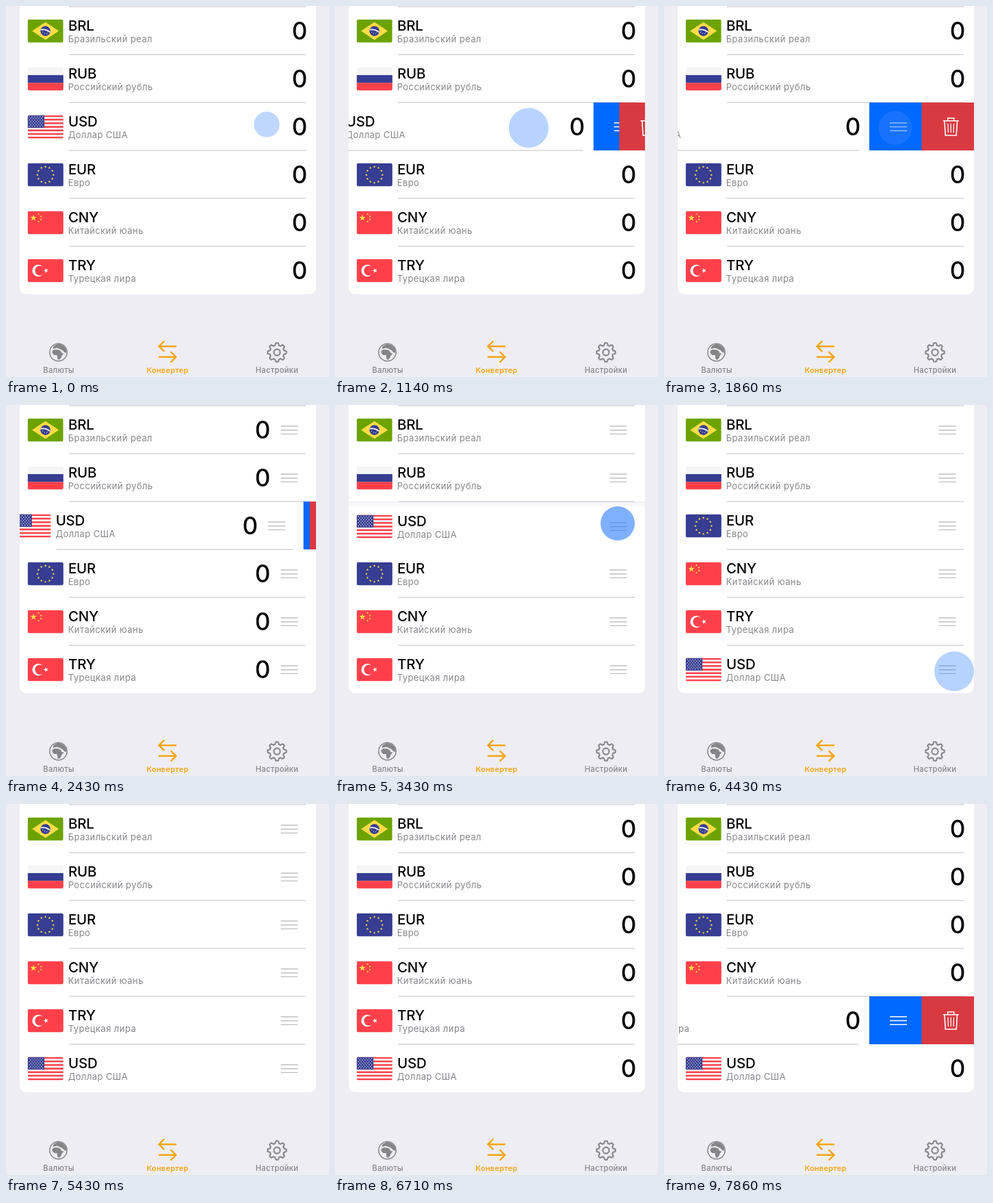
Write an HTML page with a canvas that moves like this. It is 472 px wide and 542 px high and loops after 8 s.

```html
<!DOCTYPE html>
<html lang="ru">
<head>
<meta charset="utf-8">
<title>Конвертер валют</title>
<style>
html, body { margin: 0; width: 100%; height: 100%; overflow: hidden; background: #eeedf4; }
canvas { display: block; width: 472px; height: 542px; }
</style>
</head>
<body>
<canvas id="stage"></canvas>
<script>
const W = 472, H = 542, LOOP = 8000, FPS = 7;
const LEFT = 20, RIGHT = 453, BOTTOM = 421, ROW = 70, OPEN = 153;
const PAGE = '#eeedf4', LINE = '#d2d2d5', GREY = '#85858a', ORANGE = '#f5a514';
const RED = '#ff404a', NAVY = '#363d92', YELLOW = '#ffdc45', WHITE = '#f5f5f5';
const FONT = 'Inter, Roboto, sans-serif';

const canvas = document.getElementById('stage');
const c = canvas.getContext('2d');
const dpr = window.devicePixelRatio || 1;
canvas.width = W * dpr;
canvas.height = H * dpr;

const clamp = x => Math.max(0, Math.min(1, x));
const span = (t, a, b) => clamp((t - a) / (b - a));
const smooth = x => x * x * (3 - 2 * x);
const ease = (t, a, b) => smooth(span(t, a, b));
const easeOut = (t, a, b) => 1 - (1 - span(t, a, b)) ** 3;
const mix = (a, b, p) => a + (b - a) * p;

// ---------- drawing helpers ----------
function rect(x, y, w, h, fill) {
  c.fillStyle = fill;
  c.fillRect(x, y, w, h);
}

function disc(x, y, r, fill) {
  c.beginPath();
  c.arc(x, y, r, 0, 2 * Math.PI);
  c.fillStyle = fill;
  c.fill();
}

function poly(points, fill) {
  c.beginPath();
  points.forEach(([x, y]) => c.lineTo(x, y));
  c.closePath();
  c.fillStyle = fill;
  c.fill();
}

function line(points, color, width) {
  c.beginPath();
  points.forEach(([x, y], i) => i ? c.lineTo(x, y) : c.moveTo(x, y));
  c.strokeStyle = color;
  c.lineWidth = width;
  c.stroke();
}

function star(x, y, r, fill, turn = 0) {
  const points = [];
  for (let i = 0; i < 10; i++) {
    const a = turn - Math.PI / 2 + i * Math.PI / 5, d = i % 2 ? r * 0.42 : r;
    points.push([x + d * Math.cos(a), y + d * Math.sin(a)]);
  }
  poly(points, fill);
}

function text(s, x, y, size, weight, color, align = 'left', spacing = 0) {
  c.font = `${weight} ${size}px ${FONT}`;
  c.letterSpacing = spacing + 'px';
  c.textAlign = align;
  c.fillStyle = color;
  c.fillText(s, x, y);
}

function bars(x, y, color, width) {
  for (let i = -1; i <= 1; i++) line([[x - 12.5, y + i * 5.7], [x + 12.5, y + i * 5.7]], color, width);
}

// ---------- flags, 52 x 34 ----------
const flags = {
  BRL() {
    rect(0, 0, 52, 34, '#6ca300');
    poly([[6.5, 17], [26, 4], [45.5, 17], [26, 30]], YELLOW);
    disc(26, 17, 7.3, NAVY);
    c.save();
    c.beginPath();
    c.arc(26, 17, 7.3, 0, 7);
    c.clip();
    c.beginPath();
    c.arc(22, 32, 17.3, 0, 7);
    c.strokeStyle = WHITE;
    c.lineWidth = 1.8;
    c.stroke();
    c.restore();
    [[22, 18.5], [25, 20.5], [28, 21], [29.5, 18.5]].forEach(([x, y]) => disc(x, y, 0.6, WHITE));
  },
  RUB() {
    [WHITE, NAVY, RED].forEach((color, i) => rect(0, i * 34 / 3, 52.3, 11.4, color));
  },
  USD() {
    for (let i = 0; i < 13; i++) rect(0, i * 34 / 13, 52.3, 2.7, i % 2 ? WHITE : RED);
    rect(0, 0, 24.5, 18.3, NAVY);
    for (let j = 0; j < 7; j++)
      for (let i = 0; i < 6 - j % 2; i++) star(2.6 + i * 3.9 + j % 2 * 1.95, 2.3 + j * 2.3, 1.1, WHITE);
  },
  EUR() {
    rect(0, 0, 52.3, 34, NAVY);
    for (let i = 0; i < 12; i++) {
      const a = i * Math.PI / 6;
      star(26 + 11.7 * Math.cos(a), 17 + 11.7 * Math.sin(a), 1.9, YELLOW);
    }
  },
  CNY() {
    rect(0, 0, 52.3, 34, RED);
    star(8.5, 10, 4.9, YELLOW);
    [[16, 4.5], [19.5, 8], [19.5, 12.3], [16, 15.5]].forEach(([x, y], i) => star(x, y, 1.8, YELLOW, i * 0.4));
  },
  TRY() {
    rect(0, 0, 52.3, 34, RED);
    disc(15.5, 17, 8.8, WHITE);
    disc(18, 17, 7.2, RED);
    star(26.8, 17, 3.8, WHITE, -Math.PI / 10);
  }
};

function flag(code, x, y) {
  c.save();
  c.translate(x, y);
  c.beginPath();
  c.roundRect(0, 0, 52.3, 34, 3);
  c.clip();
  flags[code]();
  c.restore();
}

// ---------- rows ----------
const rows = [
  { code: 'BRL', name: 'Бразильский реал' },
  { code: 'RUB', name: 'Российский рубль' },
  { code: 'USD', name: 'Доллар США' },
  { code: 'EUR', name: 'Евро', moves: 3575 },
  { code: 'CNY', name: 'Китайский юань', moves: 3747 },
  { code: 'TRY', name: 'Турецкая лира', moves: 3913 }
];

const dragged = t => ease(t, 3400, 4125);
const swipe = (t, start) => 56 * ease(t, start, start + 570) + (OPEN - 56) * ease(t, start + 570, start + 1070);

function rowTop(row, i, t) {
  if (row.code === 'USD') return mix(141, 359, dragged(t)) - 8 * ease(t, 4280, 4420);
  return 1 + i * ROW - (row.moves ? ROW * ease(t, row.moves, row.moves + 220) : 0);
}

function rowShift(row, t) {
  if (row.code === 'USD') return swipe(t, 430) - OPEN * easeOut(t, 2140, 2709);
  return row.code === 'TRY' ? swipe(t, 6780) : 0;
}

function trash(x, y) {
  const white = '#fff';
  line([[x - 11.5, y - 8.5], [x + 11.5, y - 8.5]], white, 1.6);
  line([[x - 4.5, y - 8.5], [x - 4.5, y - 12.5], [x + 4.5, y - 12.5], [x + 4.5, y - 8.5]], white, 1.5);
  line([[x - 9.3, y - 8.5], [x - 8, y + 12.8], [x + 8, y + 12.8], [x + 9.3, y - 8.5]], white, 1.6);
  [-1, 0, 1].forEach(i => line([[x + i * 4.3, y - 4.5], [x + i * 3.8, y + 8.8]], white, 1.3));
}

function actions(y, shift) {
  const x = RIGHT - shift, mid = RIGHT - shift / 2;
  rect(x, y, shift, ROW, '#0069ff');
  bars(x + 42.5, y + 35.5, '#fff', 1.5);
  rect(mid, y, shift / 2, ROW, '#d93a42');
  trash(mid + 42.7, y + 35.2);
}

function drawRow(row, y, t, lifted) {
  const shift = rowShift(row, t);
  const edit = ease(t, 2140, 2420) - ease(t, 5860, 6200);
  const value = 1 - ease(t, 2570, 2860) + ease(t, 5860, 6140);
  c.save();
  c.translate(-shift, y);
  flag(row.code, 31.6, 18.6);
  text(row.code, 91, 35.4, 20.5, 500, '#050505', 'left', -0.25);
  text(row.name, 90.7, 52.4, 13, 400, GREY, 'left', 0.42);
  c.globalAlpha = value;
  text('0', 440.3 - 54 * edit, 48.4, 35, 500, '#050505', 'right');
  c.globalAlpha = edit;
  bars(414 + 54 * (1 - edit), 35.7, '#bfbfc3', 1.4);
  c.globalAlpha = 1;
  if (!lifted && y < 350) rect(92, ROW - 0.7, 346, 1.4, LINE);
  c.restore();
  if (shift > 0.2) actions(y, shift);
}

// The held row is opaque except for a soft upper edge.
function drawHeld(row, y, t, lift) {
  const soft = c.createLinearGradient(0, y, 0, y + 9);
  soft.addColorStop(0, `rgba(250,250,251,${1 - 0.4 * lift})`);
  soft.addColorStop(1, '#fff');
  rect(LEFT, y, RIGHT - LEFT, ROW, soft);
  drawRow(row, y, t, true);
}

function drawList(t) {
  const lift = ease(t, 2950, 3150) - ease(t, 4280, 4420);
  const placed = rows.map((row, i) => ({ row, y: rowTop(row, i, t) }));
  const held = lift > 0 && placed.find(p => p.row.code === 'USD');
  const resting = placed.filter(p => p !== held);
  c.save();
  c.beginPath();
  c.roundRect(LEFT, -30, RIGHT - LEFT, BOTTOM + 30, 9);
  c.clip();
  rect(LEFT, 0, RIGHT - LEFT, 2, '#fff');
  resting.forEach(({ y }) => rect(LEFT, y, RIGHT - LEFT, ROW, '#fff'));
  rect(92, 0.3, 346, 1.4, LINE);
  resting.forEach(({ row, y }) => drawRow(row, y, t));
  c.restore();
  if (held) drawHeld(held.row, held.y, t, lift);
}

// ---------- tab bar ----------
function globe(x, y) {
  disc(x, y, 13.4, GREY);
  disc(x, y, 11.9, PAGE);
  c.save();
  c.translate(x, y);
  c.beginPath();
  c.arc(0, 0, 12, 0, 7);
  c.clip();
  poly([[-9, -2], [-6, -4], [-1, -4], [3, -2.5], [5, 1], [8, 1.5], [5, 5], [4, 8], [1, 11], [-1, 10], [-2, 4], [-6, 4], [-9, 1]], GREY);
  poly([[-8, -5], [-7, -9], [-2, -12], [6, -12], [12, -5], [12, 1], [9, 0], [6, -3], [2, -5], [-2, -6.5]], GREY);
  c.restore();
}

function arrows(x, y) {
  c.lineCap = c.lineJoin = 'round';
  [[-1, -8.3], [1, 7.3]].forEach(([dir, dy]) => {
    const tip = x + 12.4 * dir, ay = y + dy;
    line([[x - 12 * dir, ay], [tip, ay]], ORANGE, 2.4);
    line([[tip - 7 * dir, ay - 7], [tip, ay], [tip - 7 * dir, ay + 7]], ORANGE, 2.4);
  });
  c.lineCap = 'butt';
  c.lineJoin = 'miter';
}

function gear(x, y) {
  const points = [];
  for (let i = 0; i <= 160; i++) {
    const a = i * Math.PI / 80;
    const r = 12.1 + 1.6 * Math.max(-1, Math.min(1, 1.7 * Math.cos(8 * a)));
    points.push([x + r * Math.cos(a), y + r * Math.sin(a)]);
  }
  line(points, GREY, 2.1);
  c.beginPath();
  c.arc(x, y, 4.6, 0, 7);
  c.stroke();
}

function drawTabs() {
  globe(76.5, 506);
  arrows(236, 505.5);
  gear(396, 506);
  text('Валюты', 77, 536, 11.2, 500, GREY, 'center', 0.3);
  text('Конвертер', 236, 536, 11, 600, ORANGE, 'center', 0.25);
  text('Настройки', 396, 536, 11.2, 500, GREY, 'center', 0.3);
}

// ---------- finger ----------
const swipePath = (start, y) => t => {
  const p = ease(t, start, start + 650);
  return [mix(381, 283, p), y + 5 * p];
};
const touches = [
  { down: -100, up: 1000, at: swipePath(430, 173) },
  { down: 1680, up: 1960, at: () => [338, 178] },
  { down: 2800, up: 4290, at: t => [mix(413, 424, dragged(t)), mix(172, 389, dragged(t))] },
  { down: 6720, up: 7350, at: swipePath(6780, 313) }
];

function drawTouch({ down, up, at }, t) {
  const press = span(t, down, down + 200), fade = span(t, up, up + 280);
  if (press <= 0 || fade >= 1) return;
  const r = 25 * (1 - (1 - press) ** 2) + 8 * fade;
  c.globalAlpha = 0.6 * press * (1 - fade ** 1.2);
  disc(...at(t), r, '#2b7cff');
  c.globalAlpha = 1;
}

function draw(t) {
  c.setTransform(dpr, 0, 0, dpr, 0, 0);
  rect(0, 0, W, H, PAGE);
  drawList(t);
  drawTabs();
  touches.forEach(touch => drawTouch(touch, t));
}

const start = performance.now();
function tick(now) {
  const t = Math.max(0, now - start) % LOOP;
  const step = Math.floor((t + 5) * FPS / 1000) % (LOOP * FPS / 1000);
  draw(step * 1000 / FPS);
  requestAnimationFrame(tick);
}
draw(0);
requestAnimationFrame(tick);
</script>
</body>
</html>
```
